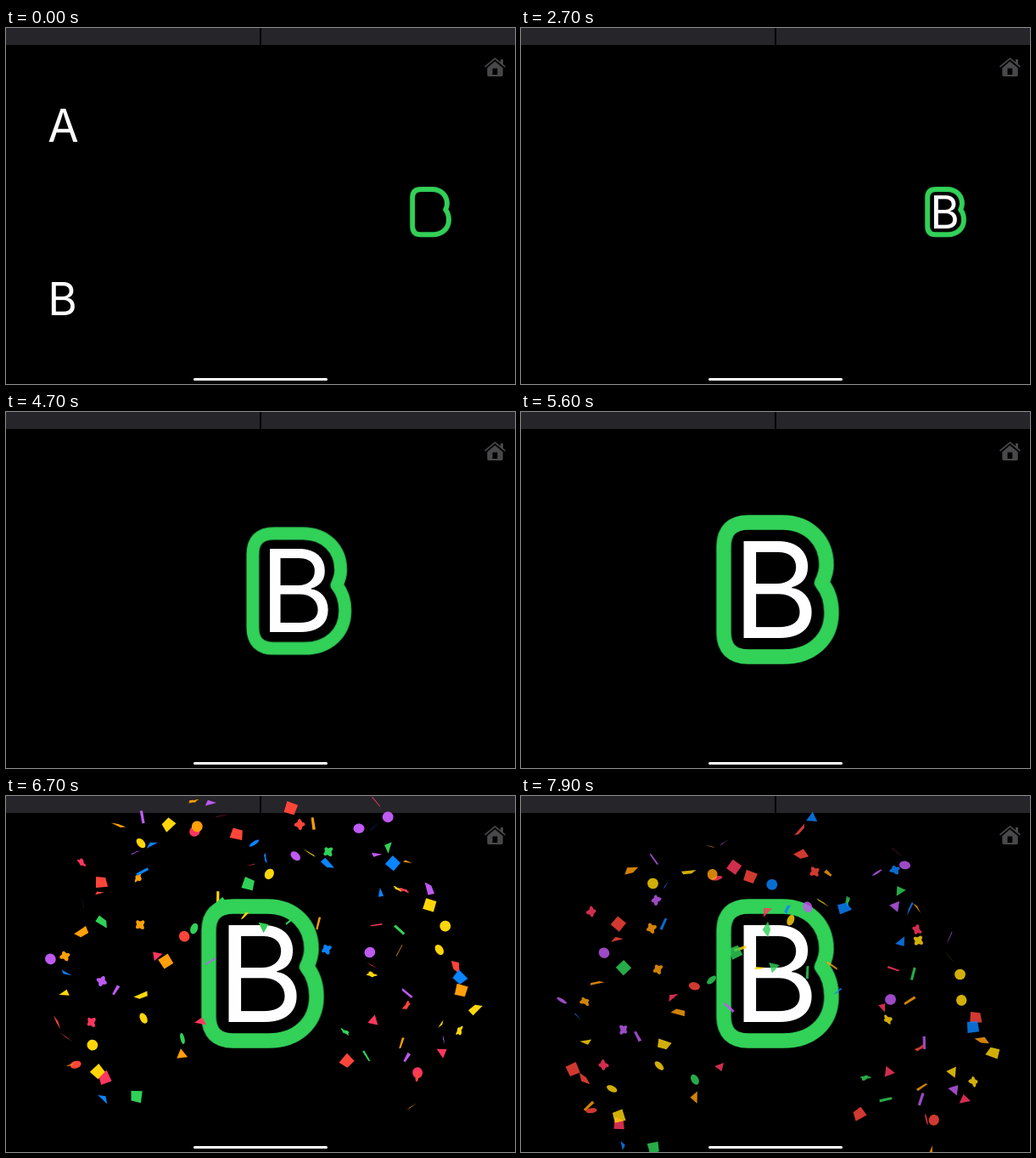
An HTML page with a canvas that plays this animation: 600x419 px, repeating every 8 s.

```html
<!DOCTYPE html>
<html lang="en">
<head>
<meta charset="utf-8">
<title>Letter match</title>
<style>
  html, body { margin: 0; width: 100%; height: 100%; overflow: hidden; background: #000; }
  svg, canvas { position: absolute; left: 0; top: 0; width: 600px; height: 419px; }
  text { fill: #fefdff; text-anchor: middle; font-family: Inter, "Open Sans", sans-serif; }
  .other { font-size: 52.9px; animation: vanish 8s linear infinite; }
  .card { animation: grow 8s linear infinite; }
  .letter { font-size: 157px; animation: drag 8s linear infinite; }
  .outline { fill: none; stroke: #32d158; stroke-width: 17.5; stroke-linejoin: round; }

  @keyframes vanish {
    0%, 26.875% { opacity: 1; }
    30%, 100% { opacity: 0; }
  }
  @keyframes grow {
    0% { transform: translate(500.5px, 216.5px) scale(.337); }
    41.81% { transform: translate(500.5px, 216.5px) scale(.337); animation-timing-function: ease-in-out; }
    66.81%, 100% { transform: translate(302.5px, 209px) scale(1); }
  }
  @keyframes drag {
    0% { transform: translate(-1285px, 304px); }
    15.625% { transform: translate(-1285px, 304px); animation-timing-function: ease-in-out; }
    26.875% { transform: translate(-15px, 43px); animation-timing-function: ease-out; }
    29.375%, 100% { transform: translate(0, 0); }
  }
</style>
</head>
<body>
<svg viewBox="0 0 600 419">
  <path fill="#262529" d="M0 0H299V20H0ZM301 0H600V20H301Z"/>
  <g fill="#48484a">
    <path d="M567.3 47L576.3 39.2L585.7 47V55.3Q585.7 57 584 57H569Q567.3 57 567.3 55.3Z"/>
    <path d="M583 37H586V44.500L583 42Z"/>
    <path fill="none" stroke="#48484a" stroke-width="1.7" stroke-linecap="round" stroke-linejoin="round" d="M565 45.300L576.4 35.800L588 45.300"/>
    <path fill="#000" d="M573.500 47.500H579.300V55H573.500Z"/>
  </g>
  <rect x="221" y="412" width="158" height="3" rx="1.5" fill="#fff"/>
  <text class="other" x="67.5" y="134">A</text>
  <g class="card">
    <path class="outline" transform="translate(-302.5 -209)" d="M268 130H308C340 130 360 152 360 180C360 190 357 196 354.500 201C361 209 366 220 366 236C366 268 342 288 310 288H268Q239 288 239 259V159Q239 130 268 130Z"/>
    <text class="letter" x="-2.5" y="57">B</text>
  </g>
</svg>
<canvas></canvas>
<script>
const LOOP = 8000, BURST = 5620, COUNT = 108, TAU = Math.PI * 2;
const COLORS = ['#ff453a', '#ff375f', '#ff9f0a', '#ffd60a', '#30d158', '#0a84ff', '#bf5af2'];

const canvas = document.querySelector('canvas');
const ctx = canvas.getContext('2d');
const ratio = window.devicePixelRatio || 1;
canvas.width = 600 * ratio;
canvas.height = 419 * ratio;

let seed = 29;
function random() {
  seed = (seed + 0x6D2B79F5) | 0;
  let n = Math.imul(seed ^ (seed >>> 15), 1 | seed);
  n = (n + Math.imul(n ^ (n >>> 7), 61 | n)) ^ n;
  return ((n ^ (n >>> 14)) >>> 0) / 4294967296;
}
const between = (low, high) => low + (high - low) * random();
const pick = list => list[Math.floor(random() * list.length)];

const polar = (steps, radius) => Array.from({ length: steps }, (_, i) => {
  const angle = i / steps * TAU, r = radius(angle);
  return [r * Math.cos(angle), r * Math.sin(angle)];
});
const box = (w, h) => [[-w, -h], [w, -h], [w, h], [-w, h]];
const SHAPES = [
  polar(24, () => 6.4),
  polar(3, () => 7.5),
  box(6.5, 6.5),
  box(7.5, 1.6),
  polar(32, a => 5.3 + 1.3 * Math.cos(4 * a))
];

// Pieces fly every way except straight down.
const pieces = Array.from({ length: COUNT }, (_, i) => {
  const angle = (-225 + 270 * (i + random()) / COUNT) * Math.PI / 180;
  const reach = 250 * (.22 + .78 * Math.sqrt(random()));
  return {
    dx: reach * Math.cos(angle),
    dy: reach * Math.sin(angle),
    drift: between(-6, 7),
    fall: between(.88, 1.15),
    shape: pick(SHAPES),
    color: pick(COLORS),
    turn: between(0, TAU),
    turnSpeed: between(-.8, .8),
    tilt: between(0, TAU),
    flip: between(0, TAU),
    flipSpeed: between(1, 4)
  };
});

function drawPiece(p, s) {
  const spread = 1 - Math.exp(-s / .16);
  const x = 302 + p.dx * spread + p.drift * s;
  const y = 209 + p.dy * spread + 3.2 * p.fall * s ** 3.5;
  const turn = p.turn + p.turnSpeed * s, flip = p.flip + p.flipSpeed * s;
  const ct = Math.cos(turn), st = Math.sin(turn);
  const ci = Math.cos(p.tilt), si = Math.sin(p.tilt);
  ctx.fillStyle = p.color;
  ctx.beginPath();
  for (const [px, py] of p.shape) {
    const u = px * ci - py * si, v = px * si + py * ci;
    const depth = 1 / (1 + v * Math.sin(flip) * .045);
    const a = u * depth, b = v * Math.cos(flip) * depth;
    ctx.lineTo(x + a * ct - b * st, y + a * st + b * ct);
  }
  ctx.fill();
}

let start;
function frame(now) {
  start ??= now;
  const t = (now - start) % LOOP;
  ctx.setTransform(ratio, 0, 0, ratio, 0, 0);
  ctx.clearRect(0, 0, 600, 419);
  if (t > BURST) {
    ctx.globalAlpha = 1 - .18 * Math.max(0, (t - 7200) / 700);
    for (const p of pieces) drawPiece(p, (t - BURST) / 1000);
  }
  requestAnimationFrame(frame);
}
requestAnimationFrame(frame);
</script>
</body>
</html>
```
